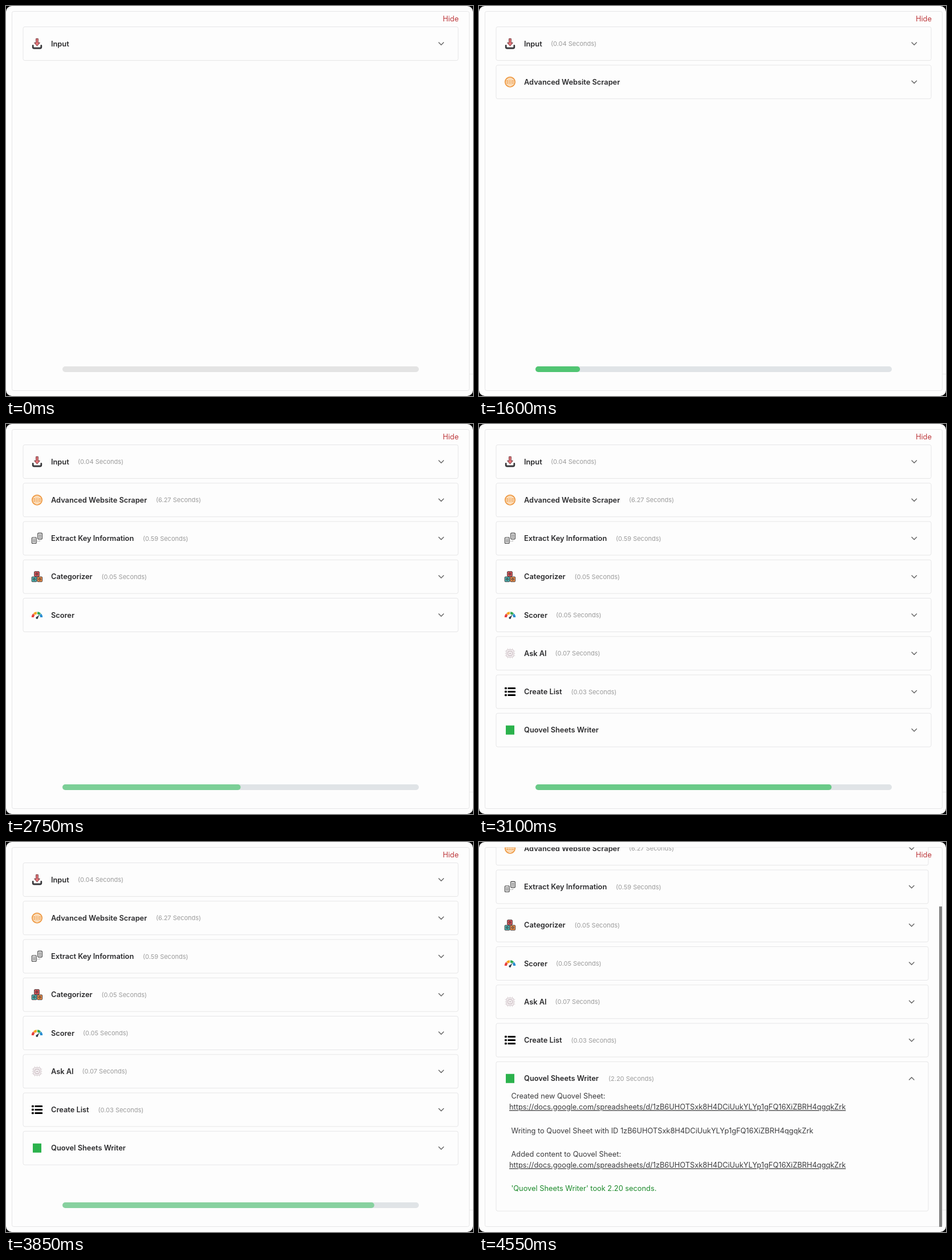
An HTML page for the animation above (4.6 s loop, 819 by 684 pixels).

```html
<!DOCTYPE html>
<html lang="en">
<head>
<meta charset="utf-8">
<title>Workflow run</title>
<style>
  html, body { margin: 0; width: 100%; height: 100%; overflow: hidden; background: #000; }
  svg { display: block; width: 819px; height: 684px; font: 12.8px Inter, sans-serif; }
  .frame { fill: #fdfdfd; stroke: #e6e6e7; }
  .name { font-weight: 600; fill: #2b2b2d; }
  .time { font-size: 11px; fill: #9b9b9b; }
  .arrow { fill: none; stroke: #686868; stroke-width: 1.5; stroke-linecap: round; stroke-linejoin: round; }
  .log { fill: #3c3c3e; }
  .link { text-decoration: underline; }
  .done { fill: #1c8a2b; }
</style>
</head>
<body>
<svg viewBox="0 0 819 684">
  <defs><clipPath id="view"><rect x="10" y="9.5" width="803" height="665"/></clipPath></defs>
  <rect width="819" height="684" rx="10" fill="#fdfdfd"/>
  <path d="M813 645.5h6" stroke="#ececec"/>
  <rect class="frame" x="10.5" y="9.5" width="802" height="665" rx="3"/>
  <g clip-path="url(#view)"><g id="list"></g></g>
  <g id="bar">
    <rect id="track" x="99" y="632" width="625" height="10" rx="5"/>
    <rect id="fill" x="99" y="632" height="10" rx="5" fill="#4ac46e"/>
  </g>
  <rect id="thumb" x="807" width="5" height="562" fill="#828282"/>
  <text x="766" y="27" fill="#bd3a3d">Hide</text>
</svg>
<script>
const LOOP = 4600, FINISH = 3930, STEP = 67.25, SCROLL = 122;
const PULSE = 652, PULSE_LOW = 1975;
const sheetId = '1zB6UHOTSxk8H4DCiUukYLYp1gFQ16XiZBRH4qgqkZrk';
const url = 'https://docs.google.com/spreadsheets/d/' + sheetId;

const page = (x, y) => `<rect x="${x}" y="${y}" width="7.5" height="10.5" rx="1" fill="#fff" stroke="#3b3b3b" stroke-width="1.2"/>
  <path d="M${x + 1.6} ${y + 3}h4.4m-4.4 2.4h4.4m-4.4 2.4h4.4" stroke="#444"/>`;
const block = (x, y, color) => `<rect x="${x}" y="${y}" width="8.6" height="8.6" rx="1" fill="${color}" stroke="#3d3435"/>
  <circle cx="${x + 4.3}" cy="${y + 4.3}" r="1.7" fill="none" stroke="#3d3435" stroke-width="1.1"/>`;
const arc = (a, b, color) => {
  const at = d => [Math.cos(d * Math.PI / 180) * 7.6, 4 - Math.sin(d * Math.PI / 180) * 7.6].map(v => v.toFixed(2));
  return `<path d="M${at(a)}A7.6 7.6 0 0 1 ${at(b)}" fill="none" stroke="${color}" stroke-width="4.2"/>`;
};

const icons = {
  input: `<path d="M-7.3 3.5V6q0 2 2 2H5.3q2 0 2-2V3.5" fill="none" stroke="#37373a" stroke-width="2.8" stroke-linecap="round"/>
    <path d="M-1.8-8.8H1.8V-1.5H4.8L0 4.2L-4.8-1.5H-1.8Z" fill="#e7767b" stroke="#6d3438" stroke-linejoin="round"/>`,
  globe: `<circle r="9.5" fill="#ee9a45"/><g fill="none" stroke="#fff0dc" stroke-width="1.1">
    <circle r="7"/><ellipse rx="3.3" ry="7"/><path d="M0-7V7M-7 0H7M-6-3.6H6M-6 3.6H6"/></g>`,
  extract: page(-9, -1.5) + page(1.3, -9.2) + `<path d="M0 5H5V2.5" fill="none" stroke="#999" stroke-dasharray="1.5 1"/>`,
  blocks: block(-4.8, -9, '#e0565b') + block(-9.3, .3, '#49b9b6') + block(.4, .3, '#f0904a'),
  gauge: arc(180, 138, '#e8413c') + arc(133, 94, '#f6a623') + arc(86, 47, '#32a852') + arc(42, 0, '#2b8fd0') +
    `<path d="M-1.6 4.2L4-.8L1.2 6Z" fill="#333c4a"/><circle cx="-.2" cy="5" r="1.9" fill="#333c4a"/>`,
  chip: `<path d="M-4-9V9M0-9V9M4-9V9M-9-4H9M-9 0H9M-9 4H9" stroke="#e2d9dc"/>
    <rect x="-6.5" y="-6.5" width="13" height="13" rx="2.5" fill="#f3eef0" stroke="#cfc4c8"/>
    <rect x="-3.5" y="-3.5" width="7" height="7" rx="1" fill="#fff" stroke="#b9a5ac"/><circle r="1.2" fill="#b9a5ac"/>`,
  list: [-6, 0, 6].map(y => `<rect x="-9.5" y="${y - 1.7}" width="3.8" height="3.4" rx="1"/><rect x="-4" y="${y - 1.5}" width="13.5" height="3" rx=".6"/>`).join(''),
  sheet: `<rect x="-7.5" y="-8" width="15" height="16" fill="#2bb24c"/>`
};

// icon, label, seconds, x of the seconds, time the row appears
const steps = [
  ['input', 'Input', '0.04', 126, 0],
  ['globe', 'Advanced Website Scraper', '6.27', 263, 200],
  ['extract', 'Extract Key Information', '0.59', 240, 2240],
  ['blocks', 'Categorizer', '0.05', 167.5, 2500],
  ['gauge', 'Scorer', '0.05', 135, 2620],
  ['chip', 'Ask AI', '0.07', 133.5, 2760],
  ['list', 'Create List', '0.03', 161.5, 2900],
  ['sheet', 'Quovel Sheets Writer', '2.20', 227, 3040]
];

// class, x, baseline below the row top, text
const log = [
  ['log', 56.5, 65, 'Created new Quovel Sheet:'],
  ['log link', 53, 84, url],
  ['log', 56.5, 125.5, 'Writing to Quovel Sheet with ID ' + sheetId],
  ['log', 56.5, 167, 'Added content to Quovel Sheet:'],
  ['log link', 53, 186, url],
  ['done', 56.5, 227, "'Quovel Sheets Writer' took 2.20 seconds."]
];

const $ = id => document.getElementById(id);
const show = (el, on) => el.setAttribute('visibility', on ? 'visible' : 'hidden');
const clamp = v => Math.max(0, Math.min(1, v));
const ease = v => { v = clamp(v); return v * v * (3 - 2 * v); };

$('list').innerHTML = steps.map(([icon, label, secs, x], i) =>
  `<g class="row" transform="translate(0 ${36.5 + STEP * i})">
    <rect class="frame" x="30" y="0" width="763" height="59" rx="3"/>
    <g transform="translate(54.5 29.5)">${icons[icon]}</g>
    <text class="name" x="79" y="34">${label}</text>
    <text class="time" x="${x}" y="33.5">(${secs} Seconds)</text>
    <path class="arrow"/>
  </g>`).join('');

const rows = [...document.querySelectorAll('.row')].map(el => ({
  el, box: el.querySelector('.frame'), time: el.querySelector('.time'), arrow: el.querySelector('.arrow')
}));
const last = rows[rows.length - 1];
last.el.insertAdjacentHTML('beforeend', '<g id="log">' +
  log.map(([c, x, y, s]) => `<text class="${c}" x="${x}" y="${y}">${s}</text>`).join('') + '</g>');

function draw(t) {
  const done = t >= FINISH;
  rows.forEach((row, i) => {
    const end = i + 1 < steps.length ? steps[i + 1][4] : FINISH;
    const open = done && row === last;
    row.el.setAttribute('display', t >= steps[i][4] ? 'inline' : 'none');
    show(row.time, t >= end);
    row.box.setAttribute('width', done ? 758 : 763);
    row.box.setAttribute('height', open ? 262 : 59);
    row.arrow.setAttribute('d', `M${done ? 754.5 : 759} ${open ? 31.7 : 27.5}l4.2 ${open ? -4.2 : 4.2}l4.2 ${open ? 4.2 : -4.2}`);
  });
  show($('log'), done);

  const scroll = SCROLL * ease((t - FINISH) / 120);
  $('list').setAttribute('transform', `translate(0 ${-scroll})`);
  show($('thumb'), done);
  $('thumb').setAttribute('y', 10 + scroll * 664 / 786);

  const part = steps.slice(1).reduce((sum, s) => sum + ease((t - s[4]) / 100), 0) / steps.length;
  show($('bar'), !done);
  $('track').setAttribute('fill', part ? '#e0e4e7' : '#e4e4e4');
  $('fill').setAttribute('width', 625 * part);
  $('fill').setAttribute('opacity', .75 - .23 * Math.cos((t - PULSE_LOW) / PULSE * 2 * Math.PI));
}

let start;
function tick(now) {
  start ??= now;
  draw((now - start) % LOOP);
  requestAnimationFrame(tick);
}
draw(0);
requestAnimationFrame(tick);
</script>
</body>
</html>
```
